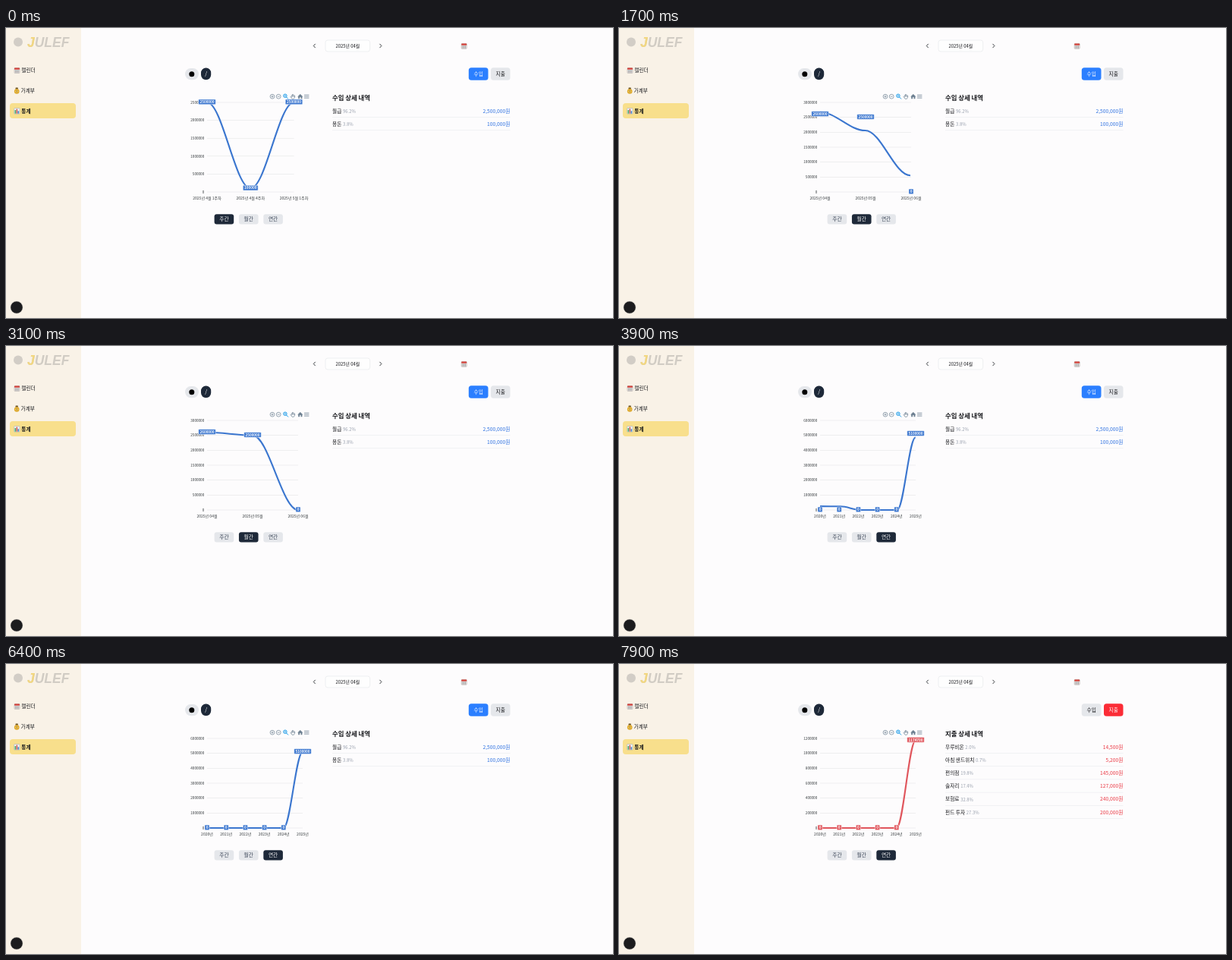
Write an HTML page with a canvas that moves like this. It is 800 by 382 pixels and loops after 8000 ms.

```html
<!DOCTYPE html>
<html lang="ko">
<head>
<meta charset="utf-8">
<title>통계</title>
<style>
  html, body { margin: 0; width: 100%; height: 100%; overflow: hidden; background: #fdfcfd; }
  canvas { display: block; width: 800px; height: 382px; }
</style>
</head>
<body>
<canvas id="stage"></canvas>
<script>
const W = 800, H = 382, LOOP = 8000, MORPH = 350;
const SANS = '"Noto Sans CJK KR", "Noto Sans CJK", "Noto Sans", sans-serif';
const INK = '#15161a', GRAY = '#e5e7eb', NAVY = '#1e2939', ICON = '#6e8192';
const PLOT = { left: 265, top: 98, bottom: 216 };

const canvas = document.getElementById('stage');
const ctx = canvas.getContext('2d');
const dpr = window.devicePixelRatio || 1;
canvas.width = W * dpr;
canvas.height = H * dpr;

const INCOME = {
  title: '수입 상세 내역', line: '#3b76cf', money: '#2b6fe0',
  rows: [['월급', '96.2%', '2,500,000원'], ['용돈', '3.8%', '100,000원']]
};
const EXPENSE = {
  title: '지출 상세 내역', line: '#e0565d', money: '#ea3540',
  rows: [
    ['무루비온', '2.0%', '14,500원'], ['아침 샌드위치', '0.7%', '5,200원'],
    ['편의점', '19.8%', '145,000원'], ['술자리', '17.4%', '127,000원'],
    ['보험료', '32.8%', '240,000원'], ['펀드 투자', '27.3%', '200,000원']
  ]
};
const YEARS = [0, 1, 2, 3, 4, 5].map(i => 2020 + i + '년');

const views = [
  { at: 0, kind: INCOME, tab: 0, right: 379.5, max: 2500000, step: 500000,
    values: [2500000, 100000, 2500000],
    names: ['2025년 4월 1주차', '2025년 4월 4주차', '2025년 5월 1주차'] },
  { at: 1450, kind: INCOME, tab: 1, right: 385, max: 3000000, step: 500000,
    values: [2600000, 2500000, 0],
    names: ['2025년 04월', '2025년 05월', '2025년 06월'] },
  { at: 3600, kind: INCOME, tab: 2, right: 391, max: 6000000, step: 1000000,
    values: [0, 0, 0, 0, 0, 5100000], names: YEARS },
  { at: 6600, kind: EXPENSE, tab: 2, right: 391, max: 1200000, step: 200000,
    values: [0, 0, 0, 0, 0, 1174700], names: YEARS }
];

const yOf = (view, v) => PLOT.bottom - (PLOT.bottom - PLOT.top) * v / view.max;
for (const view of views) {
  const gap = (view.right - PLOT.left) / (view.values.length - 1);
  view.points = view.values.map((v, i) => [PLOT.left + gap * i, yOf(view, v)]);
}

// cy is the visual middle of the glyphs.
function text(str, x, cy, size, color = INK, { align = 'left', weight = 400 } = {}) {
  ctx.font = `${weight} ${size}px ${SANS}`;
  ctx.textAlign = align;
  ctx.fillStyle = color;
  ctx.fillText(str, x, cy + size * 0.37);
  return ctx.measureText(str).width;
}

function box(x, y, w, h, r, fill, border) {
  ctx.beginPath();
  ctx.roundRect(x, y, w, h, r);
  if (fill) { ctx.fillStyle = fill; ctx.fill(); }
  if (border) { ctx.strokeStyle = border; ctx.lineWidth = 0.5; ctx.stroke(); }
}

function disc(x, y, r, fill) {
  ctx.beginPath();
  ctx.arc(x, y, r, 0, Math.PI * 2);
  ctx.fillStyle = fill;
  ctx.fill();
}

function stroke(path, color, width) {
  ctx.strokeStyle = color;
  ctx.lineWidth = width;
  ctx.stroke(new Path2D(path));
}

function button(label, x, y, w, h, r, fill, color, weight) {
  box(x, y, w, h, r, fill);
  text(label, x + w / 2, y + h / 2, 6.7, color, { align: 'center', weight });
}

function calendarIcon(x, y) {
  box(x, y, 7, 7, 0.8, '#e9e6e4', '#a79f9c');
  box(x, y, 7, 2.3, 0.8, '#d3423b');
  ctx.fillStyle = '#77787c';
  for (let i = 0; i < 6; i++) ctx.fillRect(x + 1.1 + (i % 3) * 1.8, y + 3.2 + (i > 2) * 1.8, 1.1, 1);
}

function moneyIcon(x, y) {
  box(x + 2, y, 3.4, 2.2, 0.8, '#6b5321');
  disc(x + 3.7, y + 5, 3.3, '#dda82c');
  disc(x + 3.7, y + 5, 1.8, '#f5d265');
  box(x + 3.3, y + 3.7, 0.8, 2.6, 0.2, '#80601c');
}

function barsIcon(x, y) {
  box(x, y, 7.4, 7.4, 0.6, '#f0f3f5', '#98a5ad');
  [['#45a55c', 4.6], ['#d5504b', 6], ['#3f7dbd', 3.4]].forEach(([c, h], i) => {
    ctx.fillStyle = c;
    ctx.fillRect(x + 0.9 + i * 2, y + 7 - h, 1.5, h);
  });
}

function sidebar() {
  ctx.fillStyle = '#f9f2e7';
  ctx.fillRect(0, 0, 99, H);
  disc(16, 18.5, 6, '#d2cdc6');

  ctx.font = 'italic 700 17.5px "Liberation Sans", sans-serif';
  ctx.textAlign = 'left';
  ctx.fillStyle = '#d1ccc4';
  ctx.fillText('JULEF', 28, 25);
  ctx.fillStyle = '#f2d780';
  ctx.fillText('J', 28, 25);

  box(5, 99, 87, 20, 4, '#f8df8c');
  calendarIcon(11, 52.5);
  moneyIcon(10.5, 78.5);
  barsIcon(10.7, 105.7);
  text('캘린더', 20.3, 56, 6.7);
  text('가계부', 19.5, 82.7, 6.7);
  text('통계', 20.3, 109.3, 6.7, INK, { weight: 700 });

  disc(14, 368, 8.4, '#d0cbc3');
  disc(14, 368, 7.8, '#1c1c1e');
}

function header(kind) {
  stroke('M407.7 20.9 L405.3 23.5 L407.7 26.1 M492.5 20.9 L494.9 23.5 L492.5 26.1', '#22252a', 0.9);
  box(421, 16, 58.7, 15, 3, '#fefefe', '#dfe0e4');
  text('2025년 04월', 450.3, 23.6, 5.88, INK, { align: 'center', weight: 500 });
  calendarIcon(600.2, 20.4);

  box(236, 53, 18, 15.2, 7.6, GRAY);
  disc(244.8, 60.8, 3.5, '#000');
  box(257, 52.6, 13.2, 15.6, 6.4, NAVY);
  text('/', 263.6, 60.7, 7.2, '#fff', { align: 'center' });

  const income = kind === INCOME;
  button('수입', 609.8, 52.2, 25.7, 16.6, 3.6, income ? '#2b7fff' : GRAY, income ? '#fff' : INK, 500);
  button('지출', 639, 52.2, 25.5, 16.6, 3.6, income ? GRAY : '#fb2c36', income ? INK : '#fff', 500);
}

function details(kind) {
  text(kind.title, 430, 91.5, 8.4, INK, { weight: 700 });
  kind.rows.forEach(([name, share, sum], i) => {
    const y = 109.4 + i * 17.15;
    const w = text(name, 430, y, 6.7);
    text(share, 431.7 + w, y + 0.4, 5.88, '#9aa1ae');
    text(sum, 664.4, y, 6.7, kind.money, { align: 'right' });
    ctx.fillStyle = '#e5e6ea';
    ctx.fillRect(430, y + 8, 234.5, 0.5);
  });
}

function toolbar() {
  for (const x of [351, 359.2]) {
    ctx.beginPath();
    ctx.arc(x, 90.2, 2.9, 0, Math.PI * 2);
    ctx.strokeStyle = ICON;
    ctx.lineWidth = 0.7;
    ctx.stroke();
  }
  stroke('M349.5 90.2 h3 M351 88.7 v3 M357.7 90.2 h3', ICON, 0.7);
  stroke('M370.1 89.3 a2.2 2.2 0 1 1 -4.4 0 a2.2 2.2 0 1 1 4.4 0 M369.5 91 l2.5 2.5 M366.8 89.3 h2.2', '#1398e8', 1);
  stroke('M376.3 91.2 v-3 M377.5 90.5 v-3.5 M378.7 90.5 v-3.3 M379.9 91 v-2.8 M374.8 90 l2.2 3.3 h2.4 l1.2 -2.2 v-2', ICON, 0.7);
  ctx.fillStyle = ICON;
  ctx.fill(new Path2D('M384.2 90.4 L387.8 87.1 L391.4 90.4 H390.4 V93.2 H388.5 V91 H387.1 V93.2 H385.2 V90.4 Z'));
  stroke('M393 88.2 h6.4 M393 90.2 h6.4 M393 92.2 h6.4', ICON, 0.75);
}

// Shorter shapes repeat their last point so both ends of the morph line up.
function morph(from, to, k) {
  return to.map((p, i) => {
    const q = from[Math.min(i, from.length - 1)];
    return [q[0] + (p[0] - q[0]) * k, q[1] + (p[1] - q[1]) * k];
  });
}

function curve(points, color) {
  ctx.beginPath();
  points.forEach(([x, y], i) => {
    if (!i) return ctx.moveTo(x, y);
    const [px, py] = points[i - 1], d = (x - px) * 0.35;
    ctx.bezierCurveTo(px + d, py, x - d, y, x, y);
  });
  ctx.strokeStyle = color;
  ctx.lineWidth = 2.1;
  ctx.stroke();
}

function chart(view, points) {
  for (let v = 0; v <= view.max; v += view.step) {
    const y = yOf(view, v);
    ctx.fillStyle = '#dfdfe1';
    ctx.fillRect(PLOT.left, y - 0.25, view.right - PLOT.left, 0.5);
    text(String(v), 261.2, y + 0.1, 4.62, '#373d3f', { align: 'right' });
  }
  view.names.forEach((name, i) =>
    text(name, view.points[i][0], 224.3, 5.04, '#373d3f', { align: 'center' }));
  toolbar();
  curve(points, view.kind.line);

  view.values.forEach((v, i) => {
    const [x, y] = view.points[i], label = String(v);
    ctx.font = `700 4.65px ${SANS}`;
    const w = ctx.measureText(label).width + 3.4;
    box(x - w / 2, y - 4, w, 6.7, 0.8, view.kind.line, '#fff');
    text(label, x, y - 0.6, 4.65, '#fff', { align: 'center', weight: 700 });
  });

  ['주간', '월간', '연간'].forEach((name, i) => {
    const on = i === view.tab;
    button(name, 274.6 + i * 32.35, 245.3, 25.6, 13.2, 3,
      on ? NAVY : GRAY, on ? '#fff' : '#364153', on ? 500 : 400);
  });
}

function draw(t) {
  const n = views.findLastIndex(v => t >= v.at);
  const view = views[n];
  let points = view.points;
  if (n) {
    const x = Math.min(1, (t - view.at) / MORPH);
    points = morph(views[n - 1].points, points, 0.5 - Math.cos(Math.PI * x) / 2);
  }
  ctx.setTransform(dpr, 0, 0, dpr, 0, 0);
  ctx.fillStyle = '#fdfcfd';
  ctx.fillRect(0, 0, W, H);
  sidebar();
  header(view.kind);
  chart(view, points);
  details(view.kind);
}

const start = performance.now();
function tick() {
  draw((performance.now() - start) % LOOP);
  requestAnimationFrame(tick);
}
tick();
</script>
</body>
</html>
```
